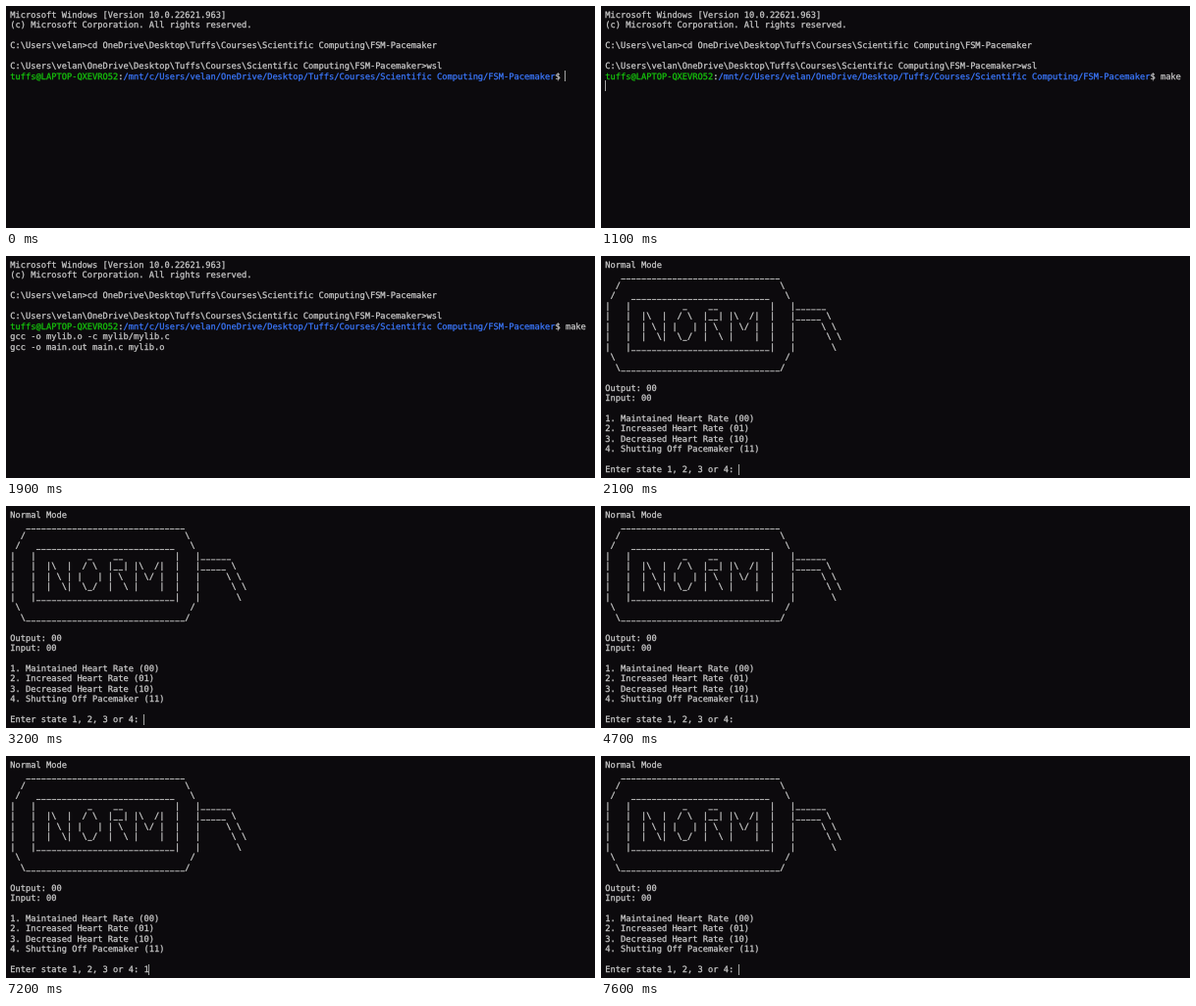
An HTML page with a canvas that plays this animation: 600 by 227 pixels, repeating every 8000 ms.

```html
<!DOCTYPE html>
<html>
<head>
<meta charset="utf-8">
<style>
html, body { margin: 0; overflow: hidden; background: #0c0a0d; }
canvas { display: block; }
</style>
</head>
<body>
<canvas id="stage" width="600" height="227"></canvas>
<script>
const ctx = document.getElementById('stage').getContext('2d');
const LOOP = 8000, LEFT = 4.3, TOP = 3.6, CELL = 5.237, ROW = 10.48;
const BACK = '#0c0a0d', GREY = '#cccccc', GREEN = '#16c60c', BLUE = '#3b78ff', CURSOR = '#a4a4a4';
const line = n => '_'.repeat(n);
const gap = n => ' '.repeat(n);
const slash = '\\';

const shell = String.raw`Microsoft Windows [Version 10.0.22621.963]
(c) Microsoft Corporation. All rights reserved.

C:\Users\velan>cd OneDrive\Desktop\Tuffs\Courses\Scientific Computing\FSM-Pacemaker

C:\Users\velan\OneDrive\Desktop\Tuffs\Courses\Scientific Computing\FSM-Pacemaker>wsl`;
const host = 'tuffs@LAPTOP-QXEVRO52';
const path = '/mnt/c/Users/velan/OneDrive/Desktop/Tuffs/Courses/Scientific Computing/FSM-Pacemaker';
const promptEnd = host.length + 1 + path.length;

const menu = String.raw`Normal Mode
   ${line(31)}
  /${gap(31)}\
 /   ${line(27)}   \
|   |          _    __          |   |______
|   |  |\  |  / \  |__| |\  /|  |   |_____ \
|   |  | \ | |   | | \  | \/ |  |   |     \ \
|   |  |  \|  \_/  |  \ |    |  |   |      \ \
|   |${line(27)}|   |       \
 ${slash}${gap(33)}/
  ${slash}${line(31)}/

Output: 00
Input: 00

1. Maintained Heart Rate (00)
2. Increased Heart Rate (01)
3. Decreased Heart Rate (10)
4. Shutting Off Pacemaker (11)

Enter state 1, 2, 3 or 4: `;

const keyTimes = [200, 350, 450, 600];
// Visible cursor spans: from, to, column, row
const menuCursor = [
  [2100, 2600, 26, 20], [3200, 3400, 26, 20], [4200, 4700, 26, 20],
  [4900, 5300, 27, 20], [5300, 6200, 26, 20], [6700, 7200, 26, 20],
  [7200, 7500, 27, 20], [7500, 7600, 0, 0], [7600, LOOP, 26, 20]
];

ctx.font = '8.7px "DejaVu Sans Mono", monospace';
ctx.textRendering = 'geometricPrecision';
ctx.lineWidth = 0.25;

function put(text, col, row, color = GREY) {
  ctx.fillStyle = ctx.strokeStyle = color;
  text.split('\n').forEach((chars, r) => [...chars].forEach((ch, c) => {
    const x = LEFT + (col + c) * CELL;
    const y = TOP + (row + r) * ROW + 8.2;
    if (ch === '_') {
      ctx.fillRect(x + 0.4, y + 0.7, CELL - 0.8, 0.9);
    } else if (ch !== ' ') {
      ctx.fillText(ch, x, y);
      ctx.strokeText(ch, x, y);
    }
  }));
}

function cursor(col, row) {
  ctx.fillStyle = CURSOR;
  ctx.fillRect(Math.floor(LEFT + col * CELL), Math.floor(TOP + row * ROW), 1, 11);
}

function drawShell(t) {
  const typed = keyTimes.filter(k => t >= k).length;
  put(shell, 0, 0);
  put(host, 0, 6, GREEN);
  put(':', host.length, 6);
  put(path, host.length + 1, 6, BLUE);
  put('$ ' + 'make'.slice(0, typed), promptEnd, 6);
  if (t >= 1200) put('gcc -o mylib.o -c mylib/mylib.c', 0, 7);
  if (t >= 1400) put('gcc -o main.out main.c mylib.o', 0, 8);
  if (t < 900) cursor(promptEnd + 2 + typed, 6);
  else if (t < 1700) cursor(0, t < 1200 ? 7 : t < 1400 ? 8 : 9);
}

function drawMenu(t) {
  put(menu, 0, 0);
  if ((t >= 4900 && t < 5300) || (t >= 7200 && t < 7500)) put('1', 26, 20);
  const span = menuCursor.find(([from, to]) => t >= from && t < to);
  if (span) cursor(span[2], span[3]);
}

function frame() {
  const t = performance.now() % LOOP;
  ctx.fillStyle = BACK;
  ctx.fillRect(0, 0, 600, 227);
  (t < 2100 ? drawShell : drawMenu)(t);
  requestAnimationFrame(frame);
}
frame();
</script>
</body>
</html>
```
